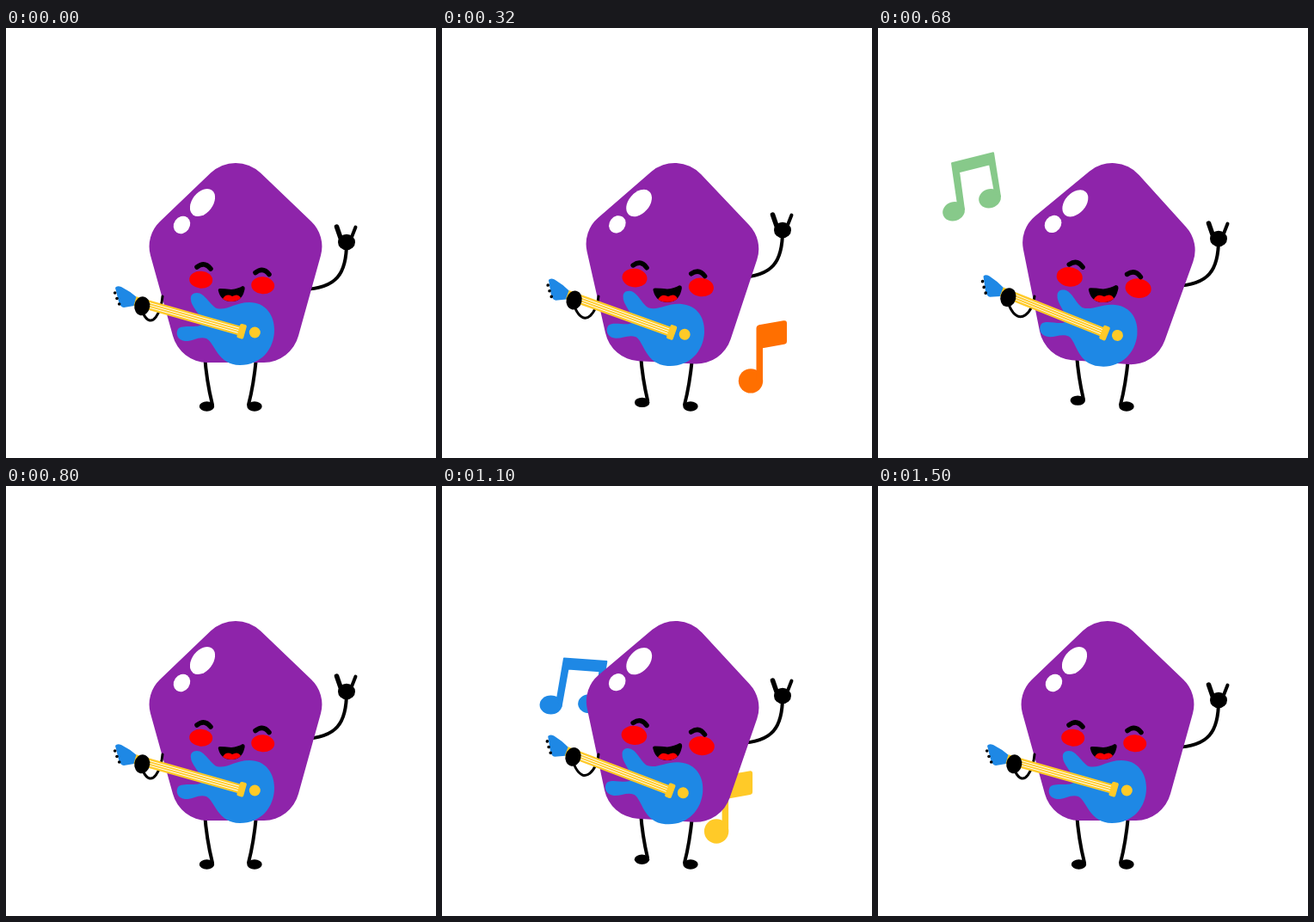
Animation of 500 by 500 pixels, one loop 1.8 s. Source, as an HTML page:

```html
<!DOCTYPE html>
<html lang="en">
<head>
<meta charset="utf-8">
<title>Guitar player</title>
<style>
  html, body { margin: 0; width: 100%; height: 100%; overflow: hidden; background: #fff; }
  svg { display: block; width: 100%; height: 100%; }
  .line { fill: none; stroke: #000; stroke-width: 4; stroke-linecap: round; }
</style>
</head>
<body>
<svg viewBox="0 0 500 500">
  <defs>
    <g id="single">
      <circle r="14.2"/>
      <path d="M6.5 0V-61Q6.5-64 9.5-65L38-70Q42-71 42-67V-46Q42-43 39-42.5L14-38V0Z"/>
    </g>
    <g id="double">
      <ellipse rx="13" ry="11" transform="rotate(-18)"/>
      <ellipse rx="13" ry="11" transform="translate(42 -15) rotate(-18)"/>
      <path d="M-2-56L46-68L54-17L48-22L42-55L6-46L12-2L5-8Z" stroke="currentColor" stroke-width="2" stroke-linejoin="round"/>
    </g>
  </defs>

  <g id="notes"></g>

  <path id="leg" class="line"/>
  <ellipse id="foot" rx="8.7" ry="5.7"/>
  <path class="line" d="M291 384Q288 415 282 438"/>
  <ellipse cx="289" cy="440" rx="8.7" ry="5.7"/>

  <g id="arm">
    <path class="line" d="M345 304C385 303 396 285 396 250"/>
    <ellipse cx="396" cy="249" rx="10" ry="9.3"/>
    <path class="line" style="stroke-width:5.5" d="M384.5 231L389 244"/>
    <path class="line" d="M406.5 231.5L402 243"/>
  </g>

  <path id="body" fill="#8e24aa" d="M238 168.500A42 42 0 0 1 296 168.500L355 225A40 40 0 0 1 366 264.500L340 358A42 42 0 0 1 300 389H234A42 42 0 0 1 194 358L168 264.500A40 40 0 0 1 179 225Z"/>
  <g id="shine" fill="#fff">
    <ellipse rx="18" ry="12" transform="translate(228.5 203) rotate(-52)"/>
    <ellipse rx="10.7" ry="9.2" transform="translate(204.5 229) rotate(-55)"/>
  </g>
  <g id="cheeks" fill="red">
    <ellipse rx="13.5" ry="10" transform="translate(226.7 292.7) rotate(4)"/>
    <ellipse rx="13.5" ry="10" transform="translate(298.7 299.3) rotate(4)"/>
  </g>
  <path id="eyes" class="line" style="stroke-width:5.5" d="M222 278Q231 271 238 280M290 284.500Q299 277.500 306 286.500"/>
  <g id="mouth">
    <path d="M249 303Q254 303 262 304Q270 303 275 300Q279 300 277 306Q274 318 262 318Q250 318 247 306Q246 303 249 303Z"/>
    <path fill="red" d="M252 315Q256 308 263 312Q270 308 273 314Q269 318 262 318Q256 318 252 315Z"/>
  </g>

  <path id="strumArm" class="line" style="stroke-width:3"/>
  <g id="guitar">
    <path fill="#1e88e5" d="M222 308C231 308 237 322 245 326C257 329 266 319 283 319C302 319 312 334 312 351C312 374 296 392 272 392C246 392 243 366 233 361C224 358 216 365 208 364C199 363 197 355 200 350C205 344 224 350 228 344C230 337 215 324 215 316C214 311 217 308 222 308Z"/>
    <path fill="#1e88e5" d="M127 302Q129 299 134 301Q144 306 152 313L149 323L137 325Q133 325 131 318Z"/>
    <circle cx="126.7" cy="308" r="1.8"/>
    <circle cx="129" cy="314.5" r="1.8"/>
    <circle cx="131.7" cy="321" r="1.8"/>
    <g transform="translate(150 317.6) rotate(15.8)">
      <path fill="#ffca28" d="M0-5.5H130V5.5H0Z"/>
      <path stroke="#fff" stroke-width=".9" d="M10-2.7H126M10 0H126M10 2.7H126"/>
      <rect x="125" y="-8.5" width="8" height="17" rx="2" fill="#ffca28"/>
    </g>
    <circle cx="289.3" cy="354" r="6.5" fill="#ffca28"/>
    <ellipse rx="9" ry="11" transform="translate(158.3 323.3) rotate(10)"/>
  </g>
</svg>
<script>
const $ = id => document.getElementById(id);
const set = (id, name, value) => $(id).setAttribute(name, value);
const svg = (tag, attrs, parent) => {
  const el = document.createElementNS('http://www.w3.org/2000/svg', tag);
  for (const name in attrs) el.setAttribute(name, attrs[name]);
  if (parent) parent.append(el);
  return el;
};

const LOOP = 1800, DANCE = 1200, STEP = 20;
const lowRoute = 'M272 352C300 400 335 414 362 410S416 376 434 353';

// Each note travels along its route at constant speed, then fades out.
const notes = [
  { shape: 'single', color: '#ff6f00', move: [0, 600], fade: [435, 600], route: lowRoute },
  { shape: 'double', color: '#4caf50', move: [300, 800], fade: [620, 800],
    route: 'M244 333C216 327 186 317 160.5 295S106 242 89 214.8S65 179 56 158' },
  { shape: 'double', color: '#1e88e5', move: [800, 1240], fade: [1140, 1272], turn: 18,
    route: 'M228 340C205 335 185 322 166 304S108 232 96 199' },
  { shape: 'single', color: '#ffca28', move: [900, 1500], fade: [1130, 1500], route: lowRoute },
];
for (const note of notes) {
  note.path = svg('path', { d: note.route });
  note.length = note.path.getTotalLength();
  note.el = svg('use', { href: '#' + note.shape, fill: note.color, color: note.color }, $('notes'));
}

const progress = (t, [from, to]) => Math.min(1, Math.max(0, (t - from) / (to - from)));
const swing = (t, period) => t < DANCE ? 1 - Math.abs(1 - 2 * (t % period) / period) : 0;
const scaleAbout = (x, y, s) => `translate(${x} ${y}) scale(${s}) translate(${-x} ${-y})`;

function draw(t) {
  const lean = swing(t, 400), tilt = 7 * lean, grow = 1 + 0.2 * lean;

  set('body', 'transform', `rotate(${tilt} 267 273)`);
  set('shine', 'transform', `rotate(${tilt} 218 215)`);
  set('eyes', 'transform', `rotate(${tilt} 264 280)`);
  set('cheeks', 'transform', `rotate(${tilt} 262.7 296) ${scaleAbout(262.7, 296, grow)}`);
  set('mouth', 'transform', scaleAbout(262.5, 309, grow));
  set('guitar', 'transform', `translate(${-16 * lean} ${-6.7 * lean}) rotate(${10 * lean} 218 346)`);
  set('arm', 'transform', `translate(0 ${-15 * swing(t, 600)})`);

  set('strumArm', 'd', `M182 312C181 328 ${170 - 9 * lean} ${354 - 6 * lean} ${159 - 11 * lean} ${331 - 14 * lean}`);
  set('leg', 'd', `M231 380Q233 ${410 - 6 * lean} ${240 - 2 * lean} ${438 - 11.5 * lean}`);
  set('foot', 'cx', 233.5 - 2 * lean);
  set('foot', 'cy', 440 - 11.5 * lean);

  for (const { el, path, length, move, fade, turn = 0 } of notes) {
    const { x, y } = path.getPointAtLength(length * progress(t, move));
    el.setAttribute('transform', `translate(${x} ${y}) rotate(${turn})`);
    el.setAttribute('opacity', t < move[0] ? 0 : 1 - progress(t, fade));
  }
}

const start = performance.now();
function tick() {
  const t = (performance.now() - start) % LOOP;
  draw(t - t % STEP);
  requestAnimationFrame(tick);
}
tick();
</script>
</body>
</html>
```
